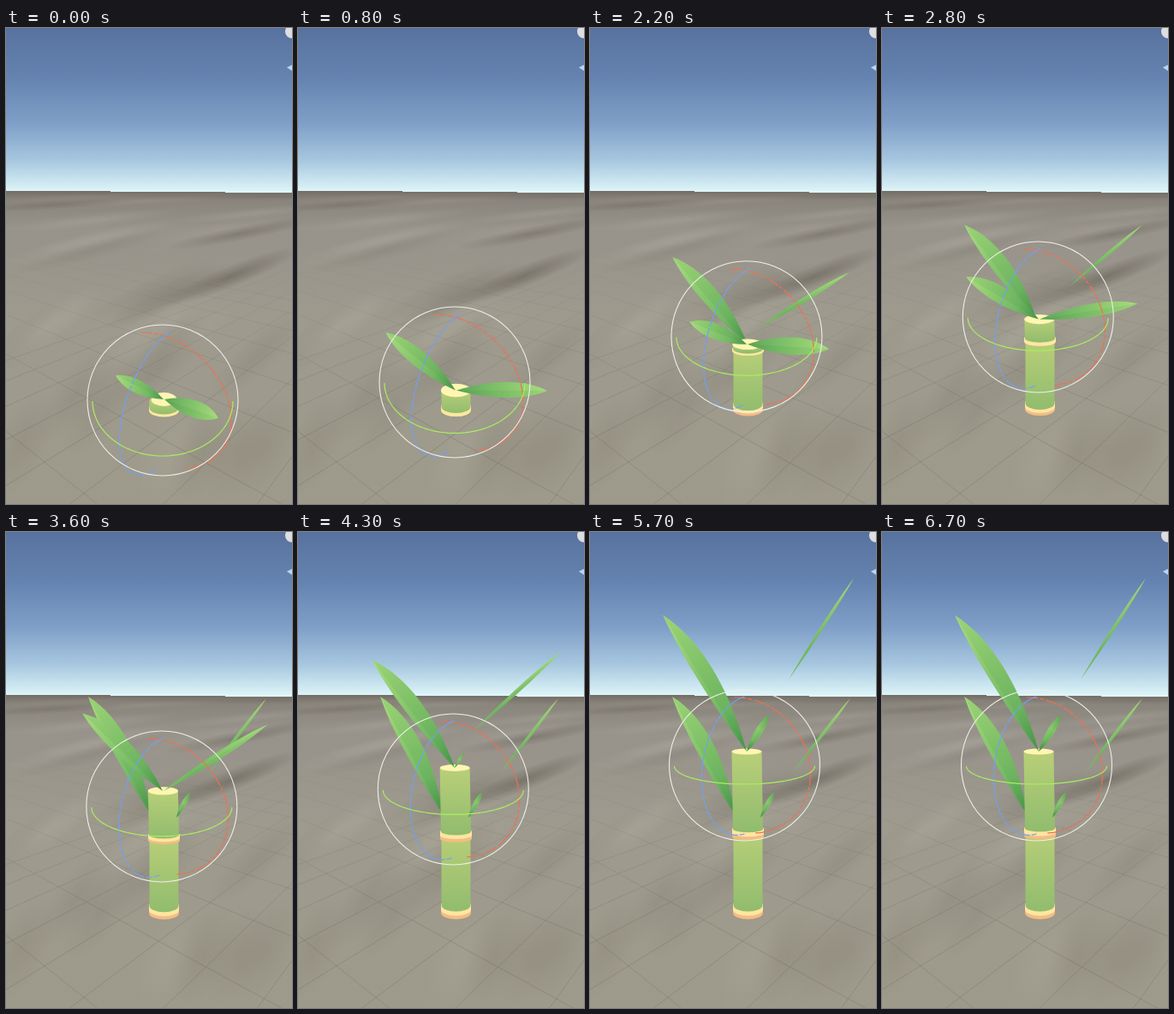
Recreate the animation shown at these times as an HTML page with a canvas. Size 334 px wide and 555 px high, loop 6.8 s.

```html
<!DOCTYPE html>
<html lang="en">
<head>
<meta charset="utf-8">
<title>Growing bamboo</title>
<style>
html, body { margin: 0; width: 100%; height: 100%; overflow: hidden; background: #9f9b8c; }
canvas { display: block; }
</style>
</head>
<body>
<canvas id="stage" width="334" height="555"></canvas>
<script>
const W = 334, H = 555, HORIZON = 190, LOOP = 6800, STEP = 100;
const g = document.getElementById('stage').getContext('2d');
const backdrop = document.createElement('canvas');
backdrop.width = W;
backdrop.height = H;

const lerp = (a, b, u) => a + (b - a) * u;
const ramp = (t, from, to) => Math.min(1, Math.max(0, (t - from) / (to - from)));
const smooth = (t, from, to) => {
  const u = ramp(t, from, to);
  return u * u * (3 - 2 * u);
};
const decay = (t, born, tau) => Math.exp(-Math.max(0, t - born) / tau);

function gradient(c, x0, y0, x1, y1, stops) {
  const paint = c.createLinearGradient(x0, y0, x1, y1);
  for (const [pos, color] of stops) paint.addColorStop(pos, color);
  return paint;
}

// Soft streak, wider and steeper the nearer it lies to the viewer.
function streak(c, x, y, shade) {
  const depth = y - HORIZON;
  const rgb = shade > 0 ? '200,196,182' : '72,66,57';
  const paint = c.createRadialGradient(0, 0, 0, 0, 0, 1);
  paint.addColorStop(0, `rgba(${rgb},${Math.abs(shade)})`);
  paint.addColorStop(.5, `rgba(${rgb},${Math.abs(shade) * .5})`);
  paint.addColorStop(1, `rgba(${rgb},0)`);
  c.save();
  c.translate(x, y);
  c.rotate(-depth * .0038);
  c.scale(100 - depth * .12, 4 + depth * .09);
  c.fillStyle = paint;
  c.fillRect(-1, -1, 2, 2);
  c.restore();
}

function paintBackdrop() {
  const c = backdrop.getContext('2d');
  c.fillStyle = gradient(c, 0, 0, 0, 192, [
    [0, '#58729f'], [.3, '#6583b0'], [.58, '#7f9fc8'],
    [.8, '#a6c6df'], [.93, '#cbe6f0'], [1, '#e0f7fa']
  ]);
  c.fillRect(0, 0, W, 193);

  c.beginPath();
  c.rect(0, HORIZON, 122, H);
  c.rect(122, HORIZON + 1, 134, H);
  c.rect(256, HORIZON + 2, 78, H);
  c.clip();
  c.fillStyle = gradient(c, 0, HORIZON, 0, H, [
    [0, '#736d66'], [.03, '#8a857c'], [.12, '#97928a'], [.4, '#9e9a8e'], [1, '#9e9a8b']
  ]);
  c.fillRect(0, HORIZON, W, H);

  let seed = 7;
  const random = () => (seed = seed * 16807 % 2147483647) / 2147483647;
  for (let i = 0; i < 26; i++) {
    const y = HORIZON + 6 + 350 * random() ** 2;
    streak(c, random() * W, y, i % 2 ? .1 : -.1);
  }
  const landmarks = [
    [262, 290, -.4], [272, 240, -.3], [60, 206, -.25], [190, 312, -.2],
    [45, 350, .25], [290, 216, .2], [110, 224, .18]
  ];
  for (const [x, y, shade] of landmarks) streak(c, x, y, shade);

  // Two families of perspective lines, fading with distance.
  c.strokeStyle = gradient(c, 0, 235, 0, 480, [[0, 'rgba(60,60,55,0)'], [1, 'rgba(60,60,55,.18)']]);
  for (let i = 0; i < 8; i++) {
    c.beginPath();
    c.moveTo(560, HORIZON);
    c.lineTo(560 - 365 * (.73 + i * .3), H);
    c.moveTo(-350, HORIZON);
    c.lineTo(-350 + 365 * (1.25 + i * .59), H);
    c.stroke();
  }
}

// Scene view controls cut off by the right edge.
function corner() {
  disc(334, 4, 8, 8, '#dcdedf');
  g.fillStyle = '#b9d6f3';
  g.beginPath();
  g.moveTo(328, 46);
  g.lineTo(334, 43);
  g.lineTo(334, 50);
  g.fill();
}

const capAt = t => lerp(433, 256, smooth(t, 0, 5400));

// Blade from base to tip, bulging by a and b on its two sides.
function blade(bx, by, tx, ty, a, b, root, tip = '#a8dc7e') {
  const dx = tx - bx, dy = ty - by, len = Math.hypot(dx, dy);
  if (len < 2) return;
  const size = Math.min(1, len / 75);
  const side = (along, off) => [bx + dx * along + dy / len * off * size, by + dy * along - dx / len * off * size];
  const edges = (p, q) => {
    g.beginPath();
    g.moveTo(bx, by);
    g.bezierCurveTo(...side(.4, p), ...side(.76, p), tx, ty);
    g.bezierCurveTo(...side(.76, q), ...side(.4, q), bx, by);
    g.fill();
  };
  g.fillStyle = gradient(g, bx, by, tx, ty, [[0, root], [.3, '#74b965'], [.6, '#8ac86e'], [1, tip]]);
  edges(a, -b);
  g.fillStyle = 'rgba(40,120,50,.09)';
  edges(0, -b);
}

function leftLeaf(bx, by, tx, ty, lift) {
  blade(bx, by, tx, ty, lerp(13, 6, lift), lerp(12, 22, lift), '#489549');
}

// Right leaves turn edge-on as they rise, leaving a short stub at the stem.
function rightLeaf(bx, by, tx, ty, lift) {
  const edgeOn = (1 - lift) ** 2;
  blade(bx, by, tx, ty, 2.5 + 14 * edgeOn, 2.5 + 11 * edgeOn, lift > .3 ? '#7fbd62' : '#5ca455');
}

function stub(x, y, dx, dy, grown) {
  blade(x, y, x + dx * grown, y + dy * grown, 9, 9, '#3f8742', '#62a855');
}

function lowerLeaves(t) {
  const y = capAt(t), settle = smooth(t, 2400, 3600);
  const leftLift = ramp(t, 0, 3400), rightLift = smooth(t, 0, 3650), slide = smooth(t, 1600, 3600);
  leftLeaf(lerp(184, 169, settle), Math.max(y, 329), 96 + 32 * decay(t, 0, 500), lerp(405, 192, leftLift), leftLift);
  rightLeaf(lerp(185, 237, slide), lerp(y, 281, slide), 304 - 56 * decay(t, 0, 550), lerp(455, 194, rightLift), rightLift);
}

function upperLeaves(t) {
  if (t < 1400) return;
  const y = capAt(t), leftLift = smooth(t, 1000, 5500), rightLift = smooth(t, 1600, 5600);
  const slide = smooth(t, 3600, 5200);
  leftLeaf(183, y, 85 + 98 * decay(t, 1400, 700), lerp(395, 97, leftLift), leftLift);
  rightLeaf(lerp(184, 232, slide), lerp(y, 172, slide), 308 - 124 * decay(t, 1400, 550), lerp(395, 54, rightLift), rightLift);
  stub(183, y, 26, -43, slide);
}

// Side wall of a cylinder with a rounded lower edge.
function wall(x0, y0, x1, y1, rx, ry, fill) {
  g.fillStyle = fill;
  g.beginPath();
  g.moveTo(x0 - rx, y0);
  g.lineTo(x1 - rx, y1);
  g.ellipse(x1, y1, rx, ry, 0, Math.PI, 0, true);
  g.lineTo(x0 + rx, y0);
  g.fill();
}

function disc(x, y, rx, ry, fill) {
  g.fillStyle = fill;
  g.beginPath();
  g.ellipse(x, y, rx, ry, 0, 0, 7);
  g.fill();
}

function ring(y, h, rx, ry) {
  disc(184.5, y, rx, ry, '#ffe9a0');
  wall(184.5, y, 184.5, y + h, rx, ry, h > 5.5 ? '#f3bd83' : '#ffe9a0');
  wall(184.5, y, 184.5, y + h * .55, rx, ry, '#ffe6a0');
}

const greens = (top, bottom) => gradient(g, 0, top, 0, bottom, [[0, '#b9cf78'], [1, '#91bc6e']]);

function stem(t) {
  const cap = capAt(t), x = lerp(183, 184.5, ramp(cap, 256, 433));
  const age = ramp(t, 0, 4000), baseY = 443 - 8 * age;
  const node = 345 + 60 * decay(t, 1400, 1100), split = t >= 1400;
  const top = split ? node : cap;
  ring(baseY, 3 + 6 * age, 17.5, 7.5);
  wall(184.5, top, 184.5, Math.max(baseY, top), 17, 7.5, greens(top, baseY + 8));
  if (split) {
    const ry = 4 + (node - 345) * .06;
    ring(node, 1 + 8 * smooth(t, 1200, 5000), 18.5, ry);
    wall(x, Math.min(cap, node), 184.5, node, 17.5, ry, greens(cap, node + 4));
  }
  disc(x, cap, lerp(15, 17.5, ramp(t, 0, 800)), 3.5 + (cap - 256) * .025, '#fff6b2');
}

// Half of a great circle spanned by two vectors.
function arc(cx, cy, ax, ay, bx, by, color, dash = []) {
  g.beginPath();
  for (let i = 0; i <= 60; i++) {
    const c = Math.cos(i * Math.PI / 60), s = Math.sin(i * Math.PI / 60);
    g.lineTo(cx + ax * c + bx * s, cy + ay * c + by * s);
  }
  g.strokeStyle = color;
  g.setLineDash(dash);
  g.stroke();
  g.setLineDash([]);
}

const path = [[0, 434], [800, 413], [2800, 337], [3600, 320], [5000, 280], [5600, 272]];
function gizmoY(t) {
  const i = path.findIndex(([time]) => time > t);
  if (i < 0) return 272;
  const [t0, y0] = path[i - 1], [t1, y1] = path[i];
  return lerp(y0, y1, ramp(t, t0, t1));
}

function gizmo(t) {
  const cy = gizmoY(t), u = ramp(cy, 272, 434);
  const cx = 180.5 + 2.5 * Math.min(1, u * 1.8);
  g.lineWidth = 1.2;
  arc(cx, cy, -12 - 14 * u, -79, 76, -2, '#ee7053', [14, 2, 5, 2]);
  arc(cx, cy, 8 * u, -80, -50, 15 + 20 * u, '#70a0f4', [18, 2, 7, 2]);
  arc(cx, cy + 1, -82, 0, 0, 21 + 43 * u, '#a9ee5f');
  g.strokeStyle = '#eeeee8';
  g.lineWidth = 1.1;
  g.beginPath();
  g.arc(cx, cy, 88, 0, 7);
  g.stroke();
}

function draw(t) {
  g.drawImage(backdrop, 0, 0);
  corner();
  const parts = [stem, lowerLeaves];
  if (t >= 2000) parts.reverse();
  for (const part of parts) part(t);
  stub(199, Math.max(capAt(t), 333), 16, -30, smooth(t, 2400, 3600));
  upperLeaves(t);
  gizmo(t);
}

paintBackdrop();
const start = performance.now();
function tick() {
  const t = (performance.now() - start) % LOOP;
  draw(Math.floor(t / STEP) * STEP);
  requestAnimationFrame(tick);
}
tick();
</script>
</body>
</html>
```
